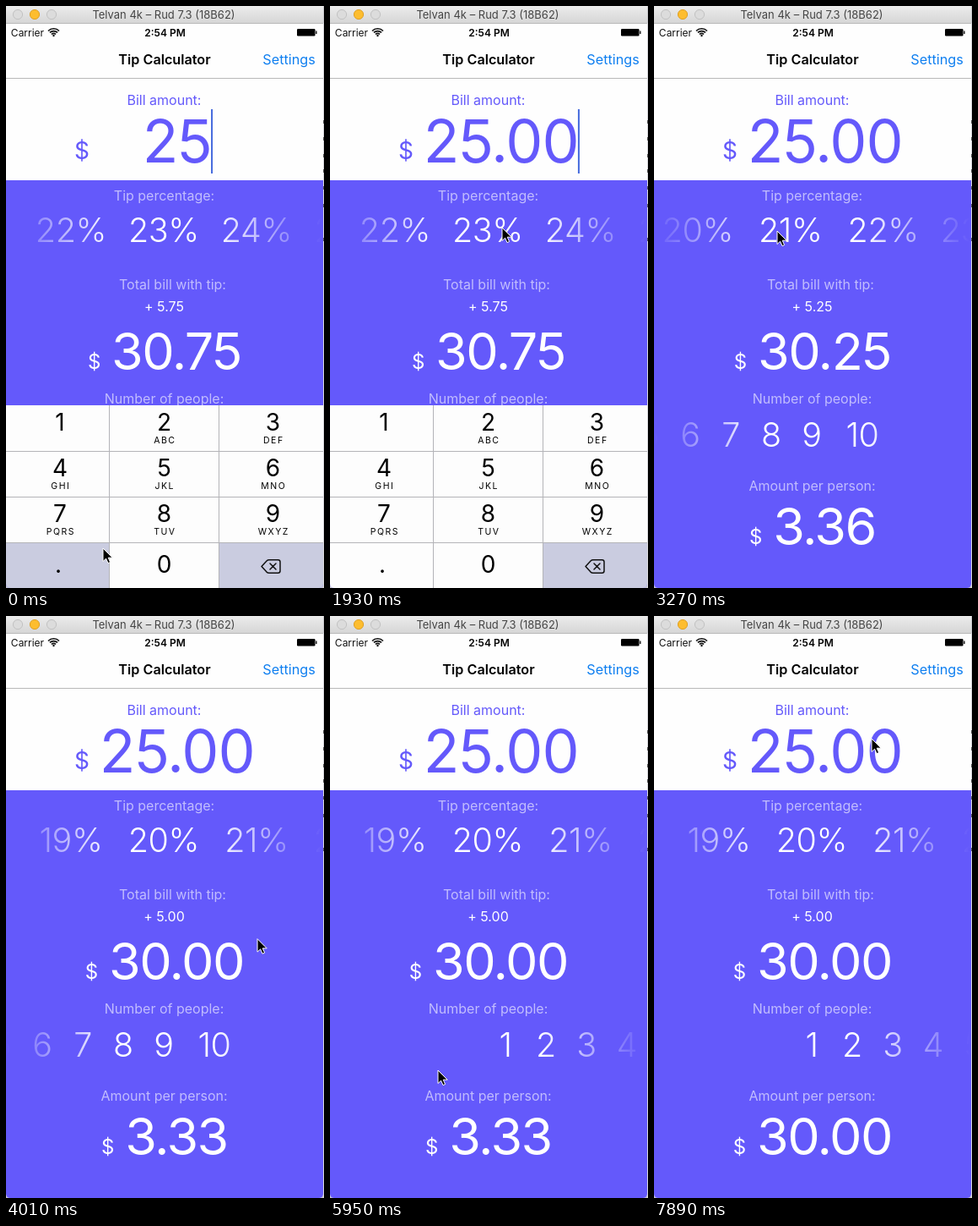
Write an HTML page that moves like this. It is 377 by 688 pixels and loops after 8000 ms.

```html
<!DOCTYPE html>
<html lang="en">
<head>
<meta charset="utf-8">
<title>Tip Calculator</title>
<style>
  html, body { margin: 0; width: 100%; height: 100%; overflow: hidden; background: #c9c9cd; }
  svg { display: block; width: 377px; height: 688px; }
  text { font-family: Inter, "Open Sans", sans-serif; font-size: 16px; text-anchor: middle; white-space: pre; }
  .bill { font-size: 70px; letter-spacing: -.015em; }
  .amount { font-size: 61px; letter-spacing: -.025em; }
  .wheel text { font-size: 39.5px; font-weight: 300; letter-spacing: -.01em; fill: #fff; }
</style>
</head>
<body>
<svg id="stage" viewBox="0 0 377 688">
  <defs>
    <linearGradient id="bar" x2="0" y2="1">
      <stop stop-color="#ececec"/><stop offset="1" stop-color="#d6d6d6"/>
    </linearGradient>
    <linearGradient id="fade">
      <stop stop-color="#fff" stop-opacity="0"/><stop offset=".33" stop-color="#fff"/>
      <stop offset=".66" stop-color="#fff"/><stop offset="1" stop-color="#fff" stop-opacity="0"/>
    </linearGradient>
    <mask id="edges" maskUnits="userSpaceOnUse" x="0" y="200" width="375" height="488">
      <rect y="200" width="375" height="488" fill="url(#fade)"/>
    </mask>
    <clipPath id="window"><path d="M0 0H376V683q0 5-5 5H5q-5 0-5-5z"/></clipPath>
  </defs>
</svg>
<script>
const PURPLE = '#6459fb', LOOP = 8000, STEP = 148.8;
const stage = document.getElementById('stage');

function add(parent, tag, attrs = {}, content) {
  const el = document.createElementNS('http://www.w3.org/2000/svg', tag);
  for (const key in attrs) el.setAttribute(key, attrs[key]);
  if (content !== undefined) el.textContent = content;
  parent.appendChild(el);
  return el;
}
const rect = (parent, x, y, width, height, fill) => add(parent, 'rect', { x, y, width, height, fill });
const label = (parent, str, x, y, fill, attrs = {}) => add(parent, 'text', { x, y, fill, ...attrs }, str);
const size = (px, weight = 400) => ({ style: `font-size:${px}px;font-weight:${weight}` });
const put = (el, x, y) => el.setAttribute('transform', `translate(${x} ${y})`);
const show = (el, on) => el.setAttribute('visibility', on ? 'visible' : 'hidden');
function write(el, str) { if (el.textContent !== str) el.textContent = str; }

// Slivers of the page behind the window
rect(stage, 376, 20, 1, 668, '#d9d9dd');
for (const y of [135, 155, 175, 193, 213, 234, 274]) rect(stage, 376, y, 1, 4, '#555');

const app = add(stage, 'g', { 'clip-path': 'url(#window)' });
rect(app, 0, 0, 376, 688, '#fefefe');

// Title bar
rect(app, 0, 0, 376, 20, 'url(#bar)');
rect(app, 0, 20, 376, 1, '#b9b9b9');
[['#dcdcdc', '#c2c2c2'], ['#fdbd2f', '#dfa023'], ['#dcdcdc', '#c2c2c2']].forEach(([fill, stroke], i) =>
  add(app, 'circle', { cx: 14 + 20 * i, cy: 10, r: 5.6, fill, stroke }));
label(app, 'Telvan 4k – Rud 7.3 (18B62)', 187, 15, '#454545', size(13));

// Status and navigation
label(app, 'Carrier', 25.5, 35.5, '#111', size(12));
for (const r of [3.5, 6.3, 9]) {
  const d = r * .72;
  add(app, 'path', { d: `M${56.5 - d} ${36 - d}A${r} ${r} 0 0 1 ${56.5 + d} ${36 - d}`, fill: 'none', stroke: '#111', 'stroke-width': 1.7 });
}
add(app, 'circle', { cx: 56.5, cy: 35, r: 1.2, fill: '#111' });
label(app, '2:54 PM', 188.5, 35.5, '#000', size(12, 600));
add(app, 'rect', { x: 345, y: 27, width: 21.5, height: 8.5, rx: 1.2 });
rect(app, 367.2, 29.5, 1.3, 3.5, '#000');
label(app, 'Tip Calculator', 188, 69, '#000', size(16.2, 600));
label(app, 'Settings', 335.5, 69, '#0f7ff0', size(16.2));
rect(app, 0, 85, 376, 1, '#b8b8b8');

// Bill
label(app, 'Bill amount:', 187.5, 117, PURPLE);
label(app, '$', 90, 181, PURPLE, size(28));
const bill = label(app, '25', 202.7, 185, PURPLE, { class: 'bill' });
const caret = rect(app, 0, 122, 2, 76, '#456add');

// Results
rect(app, 0, 206, 376, 482, PURPLE);
const soft = { opacity: .6 };
label(app, 'Tip percentage:', 187.5, 230, '#fff', soft);
label(app, 'Total bill with tip:', 197.5, 335, '#fff', soft);
label(app, 'Number of people:', 187.5, 470, '#fff', soft);
label(app, 'Amount per person:', 187.5, 573, '#fff', soft);
const extra = label(app, '', 187.5, 361, '#fff');

function amount(y) {
  const sign = label(app, '$', 0, y - 1, '#fff', size(24));
  const value = label(app, '', 202, y, '#fff', { class: 'amount' });
  return n => {
    write(value, n.toFixed(2));
    sign.setAttribute('x', 202 - value.getComputedTextLength() / 2 - 20.5);
  };
}
const setTotal = amount(430), setShare = amount(637);

function wheel(y, first, last, place, suffix) {
  const g = add(add(app, 'g', { mask: 'url(#edges)' }), 'g', { class: 'wheel' });
  for (let n = first; n <= last; n++) add(g, 'text', { x: place(n), y }, n + suffix);
  return g;
}
const tips = wheel(278.5, 15, 30, n => 187 + (n - 23) * 110, '%');
const people = wheel(521, 1, 10, n => n < 10 ? 187 + (n - 9) * 48 : 247, '');

// Keypad
const pad = add(app, 'g');
const keys = {};
const letters = ['', 'ABC', 'DEF', 'GHI', 'JKL', 'MNO', 'PQRS', 'TUV', 'WXYZ'];
const edges = [0, 122.5, 252.5, 376], centers = [64, 187.5, 316.5];
['1', '2', '3', '4', '5', '6', '7', '8', '9', '.', '0', 'del'].forEach((name, i) => {
  const col = i % 3, top = 472 + 54 * Math.floor(i / 3);
  keys[name] = rect(pad, edges[col], top, edges[col + 1] - edges[col], 54, name === 'del' ? '#cacce0' : '#fdfdfd');
  if (name !== 'del') label(pad, name, centers[col] - (name === '.' ? 2 : 0), top + (i < 9 ? 29.5 : 36), '#000', size(28));
  if (letters[i]) label(pad, letters[i], centers[col] + .8, top + 45, '#000', { style: 'font-size:10.5px;letter-spacing:1.5px' });
});
for (const y of [526, 580, 634]) rect(pad, 0, y, 376, 1, '#b4b4b8');
for (const x of [122, 252]) rect(pad, x, 472, 1, 216, '#b4b4b8');
add(pad, 'path', {
  d: 'M303 662.5l6-6.5q1.2-1.2 3-1.2h10.5q2.5 0 2.5 2.5v10.5q0 2.5-2.5 2.5h-10.5q-1.8 0-3-1.2zM313 659l7 7m0-7l-7 7',
  fill: 'none', stroke: '#111', 'stroke-width': 1.5, 'stroke-linejoin': 'round', 'stroke-linecap': 'round'
});

const pointer = add(stage, 'path', {
  d: 'M0 0V15.5L3.6 12.2 6 17.6 8.6 16.5 6.2 11.2H11.2z',
  fill: '#000', stroke: '#fff', 'stroke-width': 1
});

// Keyframes: time, then values
const pointerPath = [
  [140, 115, 641], [590, 168, 667], [1190, 168, 667], [1860, 204, 262], [2380, 204, 262],
  [2830, 318, 265], [3270, 146, 266], [3410, 150, 266], [3710, 285, 268], [4010, 298, 381],
  [4300, 310, 692], [5040, 310, 692], [5045, 366, 424], [5360, 110, 500], [5660, 300, 520],
  [5940, 128, 537], [6110, 128, 537], [6550, 278, 602], [6700, 278, 602], [7440, 305, 574],
  [7600, 305, 574], [7745, 346, 330], [7885, 258, 145]
];
const tipPath = [[2380, 0], [2830, 114], [3272, 194.5], [3410, 220], [3710, 318], [3860, 330]];
const peoplePath = [[5360, 0], [5660, 190], [5800, 400], [5860, 425], [5952, 405], [6100, 390], [6400, 384]];

function track(path, t, ease = k => k) {
  const i = path.findIndex(p => p[0] > t);
  if (i === 0) return path[0].slice(1);
  if (i < 0) return path[path.length - 1].slice(1);
  const [a, b] = [path[i - 1], path[i]];
  const k = ease((t - a[0]) / (b[0] - a[0]));
  return a.slice(1).map((v, j) => v + (b[j + 1] - v) * k);
}
const smooth = k => k * k * (3 - 2 * k);

function draw(now) {
  const t = Math.floor((now + 9) / STEP) * STEP;

  write(bill, t < 140 ? '25' : t < 740 ? '25.' : t < 1030 ? '25.0' : '25.00');
  caret.setAttribute('x', 203 + bill.getComputedTextLength() / 2 - 1);
  show(caret, t < 1950);

  keys['.'].setAttribute('fill', t < 140 ? '#cacce0' : '#fdfdfd');
  const zeroDown = (t > 580 && t < 700) || (t > 850 && t < 1000);
  keys['0'].setAttribute('fill', zeroDown ? '#cacce0' : '#fdfdfd');
  const w = Math.max(0, t - 1956) * .01826;
  const slide = 1 - (1 + w) * Math.exp(-w);
  put(pad, 0, 216 * slide);
  show(pad, slide < .99);

  put(tips, track(tipPath, t)[0], 0);
  put(people, track(peoplePath, t)[0], 0);
  put(pointer, ...track(pointerPath, t, smooth));

  const percent = t < 3110 ? 23 : t < 3850 ? 21 : 20;
  const tip = 25 * percent / 100;
  write(extra, '+ ' + tip.toFixed(2));
  setTotal(25 + tip);
  setShare((25 + tip) / (t < 6240 ? 9 : 1));
}

function tick() {
  draw(performance.now() % LOOP);
  requestAnimationFrame(tick);
}
tick();
</script>
</body>
</html>
```
